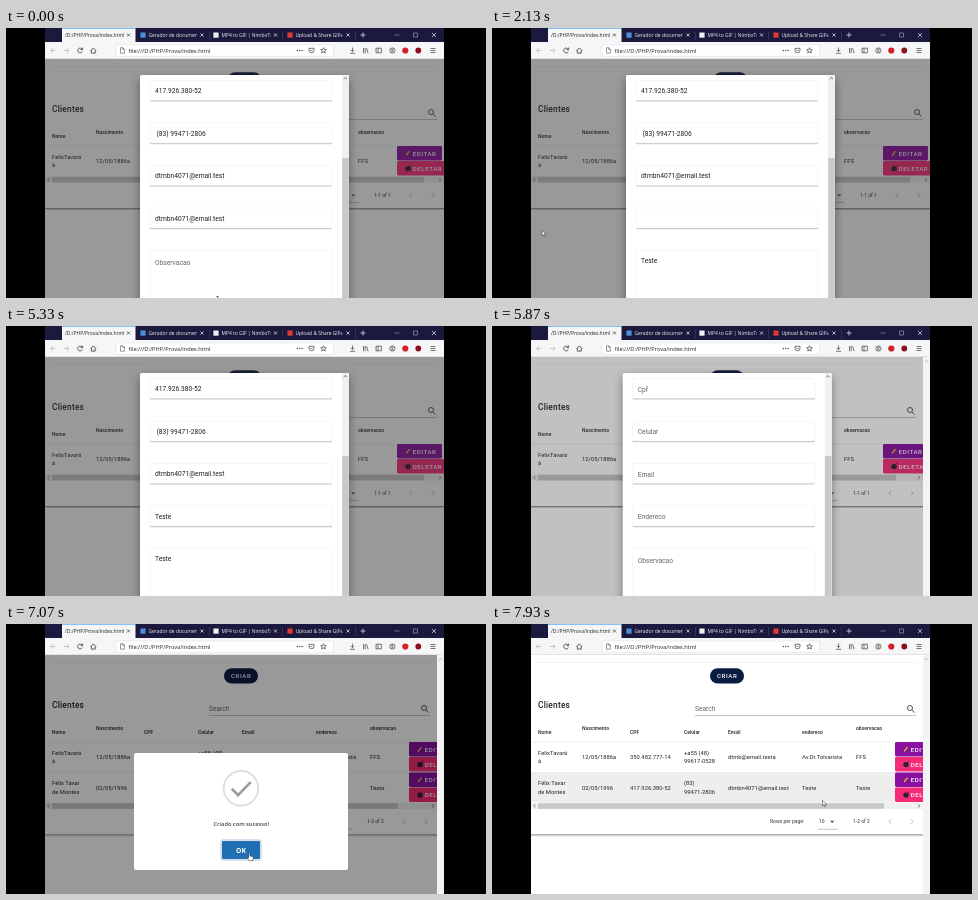
Write an HTML page that moves like this. It is 480x270 px and loops after 8000 ms.

```html
<!DOCTYPE html>
<html lang="pt">
<head>
<meta charset="utf-8">
<title>Clientes</title>
<style>
html, body { margin: 0; width: 100%; height: 100%; overflow: hidden; background: #000; }
svg { display: block; width: 100vw; height: 100vh; font-family: Roboto, sans-serif; }
text { white-space: pre; fill: #222; font-size: 5.83px; }
.ui { font-family: "Open Sans", sans-serif; font-size: 4.95px; }
.th { font-size: 5px; font-weight: 700; fill: #444; }
.small { font-size: 5px; fill: #333; }
.input { font-size: 6.67px; }
.label { font-size: 6.67px; fill: #666; }
.btn { font-size: 6.1px; font-weight: 500; fill: #fff; letter-spacing: .58px; }
.line { fill: none; stroke: #555; stroke-width: .8; }
</style>
</head>
<body>
<svg id="stage" viewBox="0 0 480 270"></svg>
<script>
const LOOP = 8000;
const MAIL = 'dtmbn4071@email.test', CPF = '417.926.380-52', PHONE = '99471-2806';
const BAR = '#1b193d';

const text = (x, y, s, cls = '', more = '') => `<text x="${x}" y="${y}" class="${cls}" ${more}>${s}</text>`;
const rect = (x, y, w, h, fill, more = '') => `<rect x="${x}" y="${y}" width="${w}" height="${h}" fill="${fill}" ${more}/>`;
const path = (d, more = '') => `<path d="${d}" class="line" ${more}/>`;
const dot = (x, y, r, fill) => `<circle cx="${x}" cy="${y}" r="${r}" fill="${fill}"/>`;
const group = (id, body, more = '') => `<g id="${id}" ${more}>${body}</g>`;
const cross = (x, y, r, c) => path(`M${x - r} ${y - r}l${2 * r} ${2 * r}m0 ${-2 * r}l${-2 * r} ${2 * r}`, `style="stroke:${c}"`);

function tabs() {
  const tab = (x, icon, title, close) => rect(x - 2.6, 4.5, 5.2, 5.2, icon) + text(x + 5.5, 9, title, 'ui', 'style="fill:#f4f4f8"') +
    rect(close - 5, 2, 14, 11, BAR) + cross(close, 7, 1.5, '#ddd') + rect(close + 7, 3, .4, 9, '#55587a');
  return rect(39, 0, 399, 14, BAR) + rect(56, 0, 73.5, 14.5, '#f5f6f7') + rect(56, 0, 73.5, .8, '#0a84ff', 'opacity=".6"') +
    text(59, 9, '/D:/PHP/Prova/index.html', 'ui') + cross(122.5, 7, 1.5, '#444') +
    tab(137, '#4a90d9', 'Gerador de documen', 196) + tab(210, '#f0f0f2', 'MP4 to GIF | NimboTr', 269.5) +
    tab(284, '#e03a30', 'Upload &amp; Share GIFs', 342) +
    path('M354.5 7h5m-2.5-2.5v5', 'style="stroke:#ddd"') +
    path('M388.5 7h5M407.5 5h4v4h-4z', 'style="stroke:#a9a9bb;stroke-width:.6"') + cross(428, 7, 2, '#d0d0d8');
}

function toolbar() {
  return rect(39, 14, 399, 17, '#f5f6f7') + rect(39, 30.5, 399, .5, '#ccc') +
    rect(110, 17, 217.5, 11.3, '#fff', 'rx="1" stroke="#d4d4d8" stroke-width=".4"') +
    path('M49.5 22.5h-5m2.3-2.3l-2.3 2.3l2.3 2.3M58 22.5h5m-2.3-2.3l2.3 2.3l-2.3 2.3', 'style="stroke:#bbb"') +
    path('M76.2 21.3a2.4 2.4 0 1 0 .1 2.2M76.6 19.6v2h-2M84.5 22.7l2.8-2.8l2.8 2.8M85.4 22.3v2.8h3.8v-2.8', 'style="stroke:#333"') +
    path('M114.5 19.7h2.4l1.5 1.5v4h-3.9zM116.7 19.8v1.6h1.6', 'style="stroke-width:.6"') +
    text(122.6, 24.5, 'file:///D:/PHP/Prova/index.html', 'ui', 'style="font-size:5.7px"') +
    dot(291.3, 22.5, .7, '#444') + dot(293.7, 22.5, .7, '#444') + dot(296.1, 22.5, .7, '#444') +
    path('M303 20.3h5v2a2.5 2.5 0 0 1-5 0zM304.3 21.8l1.2 1.2l1.2-1.2') +
    path('M317.5 19.7l.8 1.9l2 .1l-1.6 1.3l.6 2l-1.8-1.1l-1.8 1.1l.6-2l-1.6-1.3l2-.1z') +
    path('M346.5 19.5v4m-1.8-1.7l1.8 1.8l1.8-1.8M344 25.3h5M357.5 20v5.2m1.7-5.2v5.2m1.3-5l1.6 5M370 20.2h5.4v4.6H370zM372 20.2v4.6') +
    path('M389 22.5a2.6 2.6 0 1 1-5.2 0a2.6 2.6 0 1 1 5.2 0M384.8 24.4q1.6-1.6 3.2 0M387.2 21.7a.8.8 0 1 1-1.6 0a.8.8 0 1 1 1.6 0') +
    dot(399.3, 22.5, 3.1, '#d8202c') + dot(412.3, 22.5, 2.9, '#8c1020') +
    path('M424.5 20.5h5m-5 2h5m-5 2h5');
}

function action(x, y, label, color, icon) {
  const art = icon === 'pencil'
    ? path(`M${x + 9} ${y + 9.5}l3.6-4.4`, 'style="stroke:#e5b93c;stroke-width:1.3"')
    : dot(x + 11, y + 7.6, 2.7, '#2a2030') + path(`M${x + 12.5} ${y + 5.6}l1.6-1.8`, 'style="stroke:#2a2030"');
  return rect(x, y, icon === 'pencil' ? 45 : 48, 14.4, color, 'rx="1.4"') + art + text(x + 15.7, y + 9.7, label, 'btn');
}

// One table page: number of rows and the right edge of the viewport
function page(rows, right) {
  const far = rows > 1, end = far ? 310 : 298, obs = far ? 364 : 352, buttons = far ? 403 : 391;
  const bottom = 118 + rows * 30.4, shift = right - 431, foot = bottom + 20.6;
  const data = [
    ['FelixTavará', 'à', '12/05/1886a', '350.482.777-14', '+a55 (48)', '99617-0528', 'dtmb@email.testa', 'Av.Dr.Tolvarista', 'FFS'],
    ['Félix Tavar', 'de Montes', '02/05/1996', CPF, '(83)', PHONE, MAIL, 'Teste', 'Teste']
  ];
  let s = rect(39, 31, 399, 239, '#fff') + rect(45, 38, right - 51, .5, '#e4e4e4') +
    rect(218 + shift / 2, 44.2, 34, 15.4, '#0b1c42', 'rx="7.7"') +
    text(235.2 + shift / 2, 54.2, 'CRIAR', 'btn', 'text-anchor="middle"') +
    text(46, 84, 'Clientes', '', 'style="font-size:8.33px;font-weight:500;letter-spacing:.22px"') +
    text(203, 87, 'Search', 'label') + rect(203, 91.2, 221 + shift, .5, '#888') +
    path(`M${420.5 + shift} 84a2.5 2.5 0 1 1-5 0a2.5 2.5 0 1 1 5 0m-.7 1.8l2.8 2.8`, 'style="stroke-width:1"');
  [[46, 109.5, 'Nome'], [90, 105.7, 'Nascimento'], [138, 109.5, 'CPF'], [192, 109.5, 'Celular'], [236, 109.5, 'Email'],
    [end, 109.5, 'endereco'], [obs, 105.7, 'observacao']].forEach(h => s += text(...h, 'th'));
  s += rect(39, 117.8, right - 39, .5, '#ddd');
  for (let i = 0; i < rows; i++) {
    const y = 118 + i * 30.5, c = data[i];
    if (i) s += rect(39, y, right - 39, 30, '#eee', 'class="hover"') + rect(39, y, right - 39, .5, '#ddd');
    [[46, 12.8, c[0]], [46, 21.3, c[1]], [90, 17.2, c[2]], [138, 17.2, c[3]], [192, 12.8, c[4]], [192, 21.3, c[5]],
      [236, 17.2, c[6]], [end, 17.2, c[7]], [obs, 17.2, c[8]]].forEach(([x, dy, v]) => s += text(x, y + dy, v));
    s += action(buttons, y, 'EDITAR', '#8a10a2', 'pencil') + action(buttons, y + 15, 'DELETAR', '#f62c78', 'bomb');
  }
  const mid = bottom + 3.2, thumbEnd = far ? 392 : 404 + shift * 2;
  s += rect(39, bottom, right - 39, 6.4, '#f0f0f0') + rect(46, bottom + .4, thumbEnd - 46, 5.6, '#c9c9c9') +
    path(`M43.3 ${mid - 1.6}l-1.6 1.6l1.6 1.6M${right - 4.8} ${mid - 1.6}l1.6 1.6l-1.6 1.6`) +
    text(278 + shift, foot, 'Rows per page:', 'small') + text(327 + shift, foot, '10', 'small') +
    `<path d="M${338 + shift} ${foot - 2.6}h4.4l-2.2 2.2z" fill="#555"/>` + rect(326 + shift, foot + 5.5, 19.5, .5, '#888') +
    text(361 + shift, foot, far ? '1-2 of 2' : '1-1 of 1', 'small') +
    path(`M${399 + shift} ${foot - 4}l-2.2 2.2l2.2 2.2M${419 + shift} ${foot - 4}l2.2 2.2l-2.2 2.2`, 'style="stroke:#aaa"') +
    rect(39, bottom + 31.6, right - 39, .9, '#858585') + rect(39, bottom + 32.5, right - 39, 1, '#ccc');
  return s;
}

const field = (y, h) => rect(144, y + h - 1, 182, 2.4, '#e4e4e4', 'rx="1.2"') + rect(144, y + h - 1, 182, 1.6, '#a8a8a8', 'rx=".8"') +
  rect(144, y, 182, h, '#fff', 'rx="1" stroke="#e8e8e8" stroke-width=".4"');

function modal() {
  const tops = [52.5, 95, 137.5, 180, 222.5];
  const names = ['Cpf', 'Celular', 'Email', 'Endereco', 'Observacao'];
  return rect(134, 47, 209, 240, '#fff', 'rx="1.5" style="filter:drop-shadow(0 4px 5px #0006)"') +
    rect(336, 47, 7, 240, '#f0f0f0') + rect(336.2, 130, 6.6, 150, '#c9c9c9') + path('M337.6 51.2l1.7-1.7l1.7 1.7') +
    tops.map((y, i) => field(y, i < 4 ? 20 : 60)).join('') +
    group('filled', text(149, 65, CPF, 'input') + text(150.5, 107.5, '(83) ' + PHONE, 'input') + text(149, 150, MAIL, 'input')) +
    group('empty', tops.slice(0, 4).map((y, i) => text(149, y + 13, names[i], 'label')).join('')) +
    rect(149, 185.5, 70, 10, '#0078d7', 'id="mark"') +
    text(149, 192.7, '', 'input', 'id="address"') + text(149, 237, names[4], 'label', 'id="hint"') +
    text(149, 235.3, '', 'input', 'id="note"') + rect(149.2, 186.3, .6, 8.7, '#222', 'id="caret"');
}

function alertBox() {
  return rect(128, 129, 214, 117, '#fff', 'rx="2"') +
    '<circle cx="235" cy="164.3" r="17.3" fill="none" stroke="#ddd" stroke-width="1.8"/>' +
    path('M225.8 164.8l6.3 6.3l12.6-13', 'id="check" pathLength="1" stroke-dasharray="1 2" style="stroke:#9c9c9c;stroke-width:2.7"') +
    text(235.3, 201.5, 'Criado com sucesso!', 'ui', 'id="message" text-anchor="middle" style="font-size:5.7px;font-weight:600;fill:#444"') +
    rect(215, 216, 40, 20, 'none', 'id="ring" rx="1.5" stroke="#a9c3d8" stroke-width="1"') +
    rect(216, 217, 38, 18, '#3085d6', 'id="ok" rx="1"') +
    text(235, 228.8, 'OK', 'ui', 'text-anchor="middle" style="font-size:6.8px;font-weight:700;fill:#fff"');
}

const pointers =
  group('arrow', '<path d="M0 0v5.6l1.3-1.2l.9 2l.9-.4l-.9-1.9h1.8z" fill="#fff" stroke="#111" stroke-width=".45"/>') +
  group('beam', path('M-1.2 -3.5h2.4M0 -3.5v7M-1.2 3.5h2.4', 'style="stroke:#222;stroke-width:.6"')) +
  group('hand', '<path d="M-.7 .4q.7-.9 1.3 0v2.6l2.4.6q.8.3.7 1.2l-.5 2.8h-3.6l-2-3q.5-.8 1.7.3z" fill="#fff" stroke="#111" stroke-width=".45"/>');

document.getElementById('stage').innerHTML =
  '<clipPath id="view"><rect x="39" y="31" width="399" height="239"/></clipPath>' +
  '<clipPath id="window"><rect x="39" y="0" width="399" height="270"/></clipPath>' +
  rect(0, 0, 480, 270, '#000') +
  group('content', group('before', page(1, 438)) + group('middle', page(1, 431)) + group('after', page(2, 431)) +
    rect(39, 31, 399, 239, '#212121', 'id="scrim"') +
    group('modal', modal()) +
    rect(39, 31, 399, 239, '#000', 'id="dim"') +
    group('bar', rect(431, 31, 7, 239, '#f3f3f3') + path('M433 36l1.6-1.6l1.6 1.6', 'style="stroke:#aaa"')) +
    group('alert', alertBox()), 'clip-path="url(#view)"') +
  tabs() + toolbar() + group('pointer', pointers, 'clip-path="url(#window)"');

const el = id => document.getElementById(id);
const show = (id, on) => el(id).style.display = on ? '' : 'none';
const set = (id, name, v) => el(id).setAttribute(name, v);
const put = (id, s) => { if (el(id).textContent !== s) el(id).textContent = s; };
const typed = (t, times) => 'Teste'.slice(0, times.filter(k => t >= k).length);

// Linear interpolation through [time, value] points
function track(t, pts) {
  if (t <= pts[0][0]) return pts[0][1];
  for (let i = 1; i < pts.length; i++) {
    const [a, u] = pts[i - 1], [b, v] = pts[i];
    if (t < b) return u + (v - u) * (t - a) / (b - a);
  }
  return pts[pts.length - 1][1];
}
const zoom = (x, y, k) => `translate(${x} ${y}) scale(${k}) translate(${-x} ${-y})`;

// Pointer moves: kind, start, end, from, to, visible until
const moves = [
  ['beam', 0, 70, 211.5, 272, 211.5, 272, 70],
  ['beam', 70, 400, 211.5, 272, 241, 232, 930],
  ['beam', 930, 1070, 241, 232, 220, 191, 1070],
  ['beam', 1070, 1200, 220, 191, 149, 191, 1200],
  ['arrow', 1400, 1530, 50, 202.3, 50, 202.3, 4730],
  ['arrow', 4730, 5330, 50, 202.3, 165, 272, 5330],
  ['arrow', 6270, 6600, 205, 272, 243.5, 229, 6600],
  ['hand', 6600, 7270, 243.5, 229, 243.5, 229, 7270],
  ['arrow', 7270, 7530, 243.5, 229, 424, 168, 7530],
  ['hand', 7530, 7730, 424, 168, 424, 168, 7730],
  ['arrow', 7870, 7930, 330, 175.5, 330.5, 176.3, LOOP]
];

function pointer(t) {
  const m = moves.find(m => t >= m[1] && t < m[7]);
  ['arrow', 'beam', 'hand'].forEach(k => show(k, m && m[0] === k));
  if (!m) return;
  const p = Math.min(1, (t - m[1]) / (m[2] - m[1])), e = p * p * (3 - 2 * p);
  set(m[0], 'transform', `translate(${m[3] + (m[5] - m[3]) * e} ${m[4] + (m[6] - m[4]) * e})`);
}

function form(t) {
  const sent = t >= 5870;
  const note = typed(t, [470, 530, 600, 670, 730]);
  const keys = typed(t, [3470, 3670, 3930, 4070, 4130]);
  put('note', sent ? '' : note);
  show('hint', sent || !note);
  put('address', sent ? '' : t < 1930 ? MAIL : keys);
  show('filled', !sent);
  show('empty', sent);
  const left = track(t, [[1070, 219], [1200, 149]]);
  const marked = t >= 1070 && t < 1930;
  show('mark', marked);
  set('mark', 'x', left);
  set('mark', 'width', 219 - left);
  el('address').style.fill = marked && t > 1135 ? '#fff' : '';
  show('caret', (t >= 1930 && t < 2130) || (t >= 2670 && t < 3200) || (t >= 3470 && t < 4270) || (t >= 4730 && t < 5270));
  set('caret', 'x', 149.2 + (keys ? el('address').getComputedTextLength() : 0));
}

function render(t) {
  show('before', t < 5870);
  show('middle', t >= 5870 && t < 6870);
  show('after', t >= 6870);
  document.querySelector('.hover').style.display = t >= 7400 ? '' : 'none';
  show('bar', t >= 5870);

  form(t);
  const out = track(t, [[5930, 0], [6110, 1]]);
  show('modal', t < 6110);
  set('modal', 'opacity', 1 - out);
  set('modal', 'transform', (t < 5870 ? '' : 'translate(-3.3 0) ') + zoom(238, 170, 1 - .5 * out));
  set('scrim', 'opacity', t < 5870 ? .46 : track(t, [[5870, .28], [5930, .27], [6110, 0]]));

  show('alert', t >= 6120 && t < 7350);
  set('alert', 'transform', zoom(235, 187.5, track(t, [[6190, .7], [6325, 1.05], [6430, .95], [6490, 1], [7200, 1], [7350, .5]])));
  set('alert', 'opacity', track(t, [[7200, 1], [7350, 0]]));
  set('dim', 'opacity', track(t, [[6190, 0], [6290, .4], [7200, .4], [7300, 0]]));
  set('message', 'opacity', track(t, [[6190, 0], [6290, 1]]));
  show('check', t >= 6330);
  set('check', 'stroke-dashoffset', track(t, [[6330, 1], [6650, 0]]));
  show('ring', t >= 6290);
  set('ok', 'fill', t >= 6730 ? '#1f6fb2' : '#3085d6');

  pointer(t);
}

let start;
function tick(now) {
  start ??= now;
  render((now - start) % LOOP);
  requestAnimationFrame(tick);
}
render(0);
requestAnimationFrame(tick);
</script>
</body>
</html>
```
